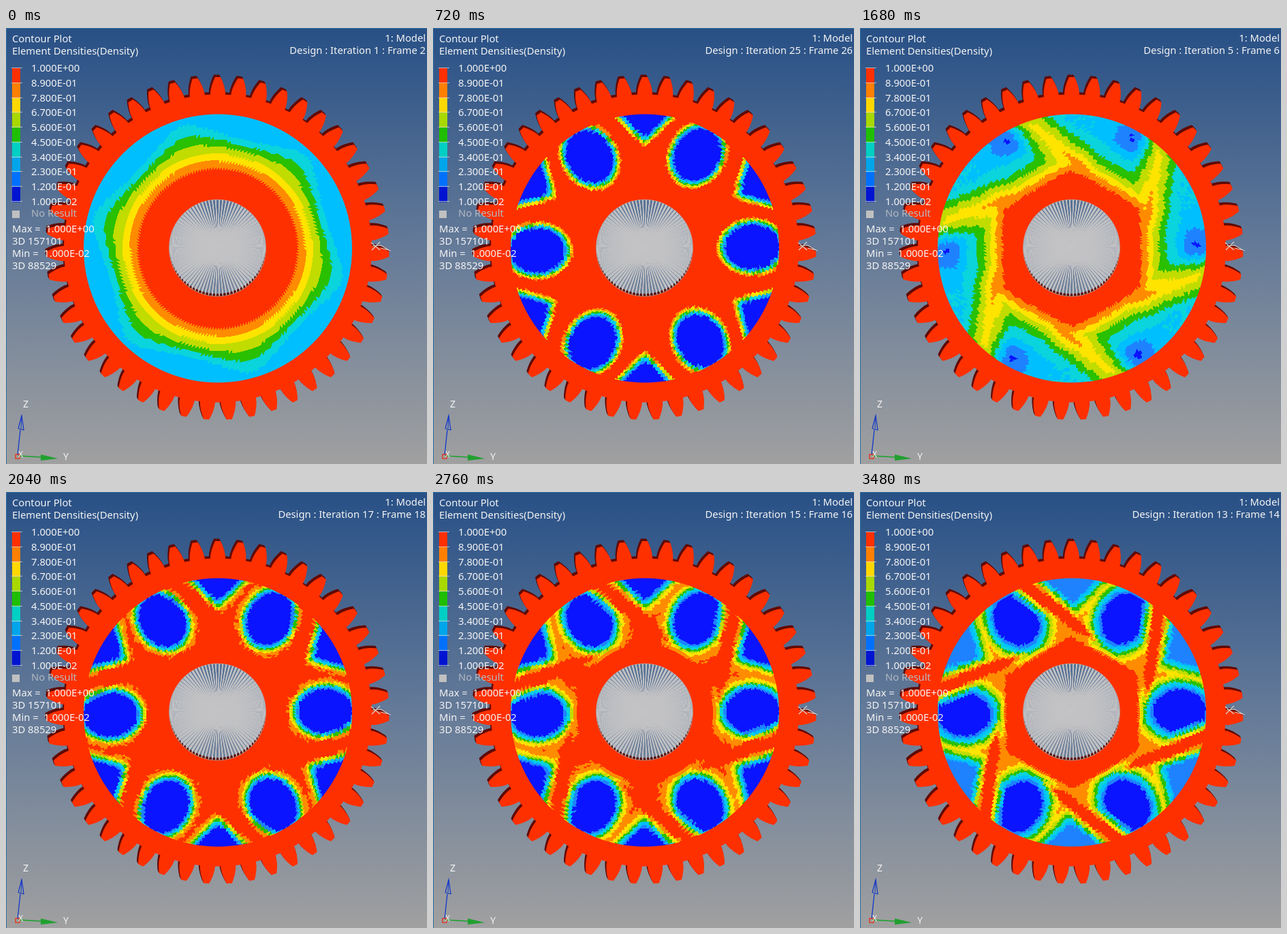
Animation of 618 by 640 pixels, one loop 3.6 s. Source, as an HTML page with a canvas:

```html
<!DOCTYPE html>
<html lang="en">
<head>
<meta charset="utf-8">
<title>Gear density contour</title>
<style>
html, body { margin: 0; width: 100%; height: 100%; overflow: hidden; background: #5c7896; }
canvas { display: block; }
</style>
</head>
<body>
<canvas id="view" width="618" height="640"></canvas>
<script>
const start = performance.now();
const W = 618, H = 640, CX = 311, CY = 323.5, RIM = 197, BORE = 71;
const DEG = Math.PI / 180, TAU = Math.PI * 2;
const PALETTE = ['#ff3000', '#ff8c00', '#ffe400', '#c0dc00', '#28c000', '#0ad4dc', '#00bfff', '#1e82ff', '#0a14ff'];
const LEGEND = ['#ff3000', '#ff8000', '#ffd800', '#a8d800', '#20be00', '#00cfc4', '#00a5ea', '#0070ff', '#0014d2'];
const FAMILY = '"Noto Sans", "Open Sans", sans-serif';
const FONT = '14.75px ' + FAMILY;
const ctx = document.getElementById('view').getContext('2d');

const clamp = (x, a, b) => Math.min(b, Math.max(a, x));
const mix = (a, b, t) => a + (b - a) * t;
const fold = a => a - Math.round(a / 60) * 60;

function layer(w, h) {
  const c = document.createElement('canvas');
  c.width = w;
  c.height = h;
  return c;
}

// ---- density fields (r in px, a in degrees, counter-clockwise) ----
function geometry(r, a) {
  const wide = fold(a - 1) * DEG, narrow = fold(a - 30) * DEG;
  const u = r * Math.cos(wide), v = r * Math.sin(wide);
  // Distance to the nearest of six tilted spokes, which taper towards the hub.
  let spoke = Infinity;
  for (let k = 0; k < 6; k++) {
    const t = (a - 51 - 60 * k) * DEG;
    const q = Math.abs(r * Math.cos(t) - 103.5);
    spoke = Math.min(spoke, q + .35 * Math.max(0, 70 - r * Math.sin(t)));
  }
  // Signed distances to the large oval and small wedge-shaped pockets.
  const oval = (Math.hypot((u - 158) / 54, v / 44) - 1) * 47;
  const wedge = (Math.hypot(r * Math.sin(narrow), 4) - (r * Math.cos(narrow) - 145)) * .707;
  return { r, a, u, v, spoke, oval, wedge };
}

function early({ r, a }) {
  const d = Math.max(0, r - 115);
  const wave = .003 * d * d * Math.cos(6 * (a - 46) * DEG);
  return Math.max(.26, .89 - .0101 * (r - wave - 117.5));
}

function forming({ r, u, v, spoke }) {
  const core = .89 - .0145 * (u - 98);
  const ridge = .86 + .08 * clamp((r - 155) / 30, 0, 1) - .0145 * spoke;
  const dip = .34 * Math.exp(-((u - 183) ** 2 + v * v) / 968);
  return Math.max(core, ridge, .38) - dip;
}

function middle({ u, spoke, oval, wedge }) {
  const ramp = d => Math.min(.5 + .028 * d, .66 + .01 * d, .87);
  const pocket = Math.min(ramp(oval), Math.max(.17, ramp(wedge)));
  return Math.max(pocket, .89 - .04 * (u - 97), 1.25 - .045 * spoke);
}

const late = ({ oval, wedge }) => .98 + .07 * Math.min(oval, wedge);

function density(it, g) {
  const blend = (f, h, t) => mix(clamp(f(g), .01, 1), clamp(h(g), .01, 1), t);
  if (it <= 7) return blend(early, forming, (it - 1) / 6);
  if (it <= 13) return blend(forming, middle, (it - 7) / 6);
  return blend(middle, late, 1 - Math.exp((13 - it) / 3.2));
}

// ---- triangular polar mesh: every pixel belongs to one flat-coloured cell ----
const STEP = 5, SECTORS = 180, SIZE = 2 * RIM + 2;
const cells = [], lookup = new Int32Array(SIZE * SIZE).fill(-1);

function buildMesh() {
  const ids = new Map();
  for (let y = 0; y < SIZE; y++) for (let x = 0; x < SIZE; x++) {
    const dx = x + .5 - SIZE / 2, dy = SIZE / 2 - y - .5;
    const r = Math.hypot(dx, dy);
    if (r > RIM + 1.5 || r < BORE - 2) continue;
    const row = Math.floor(r / STEP), shift = row % 2 / 2;
    const t = (Math.atan2(dy, dx) / TAU + 1) * SECTORS + shift;
    const col = Math.floor(t);
    const up = r / STEP - row + t - col > 1 ? 1 : 0;
    const key = (row * 2 * SECTORS + col % SECTORS) * 2 + up;
    if (!ids.has(key)) {
      const f = (1 + up) / 3;
      const g = geometry((row + f) * STEP, (col + f - shift) * 360 / SECTORS);
      const h = Math.sin(key * 12.9898) * 43758.5453;
      g.noise = h - Math.floor(h) - .5;
      ids.set(key, cells.length);
      cells.push(g);
    }
    lookup[y * SIZE + x] = ids.get(key);
  }
}

const rgb = PALETTE.map(c => [1, 3, 5].map(i => parseInt(c.slice(i, i + 2), 16)));
const discs = {};

function disc(it) {
  if (discs[it]) return discs[it];
  const bands = cells.map(g => {
    const d = density(it, g) + g.noise * .003 * it;
    return clamp(Math.floor((1 - d) / .11), 0, 8);
  });
  const c = layer(SIZE, SIZE), k = c.getContext('2d');
  const img = k.createImageData(SIZE, SIZE);
  lookup.forEach((id, i) => {
    if (id < 0) return;
    img.data.set(rgb[bands[id]], i * 4);
    img.data[i * 4 + 3] = 255;
  });
  k.putImageData(img, 0, 0);
  return discs[it] = c;
}

// ---- static parts ----
function gearPath() {
  const p = new Path2D(), teeth = 47, root = 226, depth = 25.5;
  for (let i = 0; i < teeth; i++) for (let j = -6; j <= 6; j++) {
    if (!j) continue;
    // j runs up the left flank and down the right one
    const x = (6 - Math.abs(j)) / 5, half = 2.8 - 1.9 * x ** 1.6;
    const a = (i * 360 / teeth + Math.sign(j) * half) * DEG, r = root + depth * x;
    p.lineTo(r * Math.sin(a), -r * Math.cos(a));
  }
  p.closePath();
  return p;
}

function line(k, color, width, ...pts) {
  k.strokeStyle = color;
  k.lineWidth = width;
  k.beginPath();
  for (let i = 0; i < pts.length; i += 2) k.lineTo(pts[i], pts[i + 1]);
  k.stroke();
}

function circle(k, x, y, r) {
  k.beginPath();
  k.arc(x, y, r, 0, TAU);
}

function drawBase(k) {
  const sky = k.createLinearGradient(0, 0, 0, H);
  sky.addColorStop(0, '#285086');
  sky.addColorStop(.5, '#647a98');
  sky.addColorStop(1, '#a0a0a0');
  k.fillStyle = sky;
  k.fillRect(0, 0, W, H);
  line(k, '#2f6f9f', 1, .5, H, .5, .5, W, .5);

  const gear = gearPath();
  for (let d = 4; d >= 0; d--) {
    k.save();
    k.translate(CX - d * .5, CY - d * .9);
    k.fillStyle = d ? '#600a04' : PALETTE[0];
    k.fill(gear);
    k.restore();
  }
  return sky;
}

function drawBore(k, sky) {
  const x = 310.5, y = 323, n = 84;
  k.save();
  circle(k, x, y, BORE);
  k.clip();
  k.fillStyle = '#5a0c06';
  k.fillRect(x - 80, y - 80, 160, 160);
  circle(k, x - .5, y - 4, BORE);
  k.fillStyle = sky;
  k.fill();
  // Rigid links from the hub to five depths of the bore wall.
  for (let i = 0; i < n; i++) for (let d = 0; d < 5; d++) {
    const a = (i + .5) * TAU / n;
    line(k, '#c2c2c4', 1.1, x + .5, y - 2, x + BORE * Math.cos(a), y + BORE * Math.sin(a) - d * 1.1);
  }
  k.restore();
  circle(k, x, y, BORE);
  k.strokeStyle = 'rgba(200,190,186,.6)';
  k.lineWidth = 1;
  k.stroke();
}

function text(k, s, x, y, color = '#f4f4f4') {
  k.fillStyle = color;
  k.fillText(s, x, y + 5);
}

function drawLabels(k) {
  const gap = 21.78;
  k.font = FONT;
  text(k, 'Contour Plot', 9, 16);
  text(k, 'Element Densities(Density)', 9, 34);
  LEGEND.forEach((c, i) => {
    k.fillStyle = c;
    k.fillRect(9, 59 + i * gap, 12, gap + .5);
  });
  for (let i = 0; i < 10; i++) {
    const y = 59 + i * gap, v = 1 - .11 * i;
    const [m, e] = v.toExponential(3).split('e');
    text(k, m + 'E' + e[0] + e.slice(1).padStart(2, '0'), 37, y);
    line(k, 'rgba(225,225,225,.7)', 1, 8, Math.round(y) - .5, 24, Math.round(y) - .5);
  }
  k.fillStyle = '#c0c0c0';
  k.fillRect(9, 268, 11, 11);
  text(k, 'No Result', 37, 272, '#b4bac2');
  ['Max =  1.000E+00', '3D 157101', 'Min =  1.000E-02', '3D 88529']
    .forEach((s, i) => text(k, s, 9, 295 + 18 * i));
  k.textAlign = 'right';
  text(k, '1: Model', 616, 15);
  k.textAlign = 'left';
}

function drawAxes(k) {
  line(k, '#1238c8', 1.3, 17, 627, 21, 590);
  line(k, '#1238c8', 1.2, 18, 588, 23, 569, 26, 590, 18, 588);
  line(k, '#1238c8', 1, 22, 588, 23, 569);
  line(k, '#18a428', 1.3, 18, 628, 52, 630);
  k.fillStyle = '#20a030';
  k.beginPath();
  k.moveTo(51, 626);
  k.lineTo(76, 632);
  k.lineTo(51, 635);
  k.fill();
  k.strokeStyle = '#e83018';
  k.strokeRect(14, 626, 6, 6);
  k.font = '14px ' + FAMILY;
  text(k, 'Z', 25, 552);
  text(k, 'Y', 84, 629);
  k.font = '12px ' + FAMILY;
  text(k, 'X', 18, 625);
}

function drawMarker(k) {
  const c = '#d8d0cc';
  line(k, c, 1.2, 536, 315, 549, 326);
  line(k, c, 1.2, 549, 314, 537, 326);
  line(k, c, 1.2, 538, 320, 550, 319, 562, 326, 550, 323);
}

buildMesh();
const base = layer(W, H), over = layer(W, H);
const sky = drawBase(base.getContext('2d'));
const top2d = over.getContext('2d');
drawBore(top2d, sky);
drawMarker(top2d);
drawLabels(top2d);
drawAxes(top2d);

let shown = -1;
function render(it) {
  ctx.drawImage(base, 0, 0);
  ctx.save();
  circle(ctx, CX, CY, RIM);
  ctx.clip();
  ctx.drawImage(disc(it), Math.round(CX - SIZE / 2), Math.round(CY - SIZE / 2));
  ctx.restore();
  ctx.drawImage(over, 0, 0);
  ctx.font = FONT;
  ctx.textAlign = 'right';
  text(ctx, `Design : Iteration ${it} : Frame ${it + 1}`, 616, 33);
}

// The 26-state result is sampled every fourth state, 120 ms apart.
function tick() {
  const k = Math.floor((performance.now() - start) % 3600 / 120);
  const it = (1 + 4 * k) % 26;
  if (it !== shown) render(shown = it);
  requestAnimationFrame(tick);
}
tick();
</script>
</body>
</html>
```
